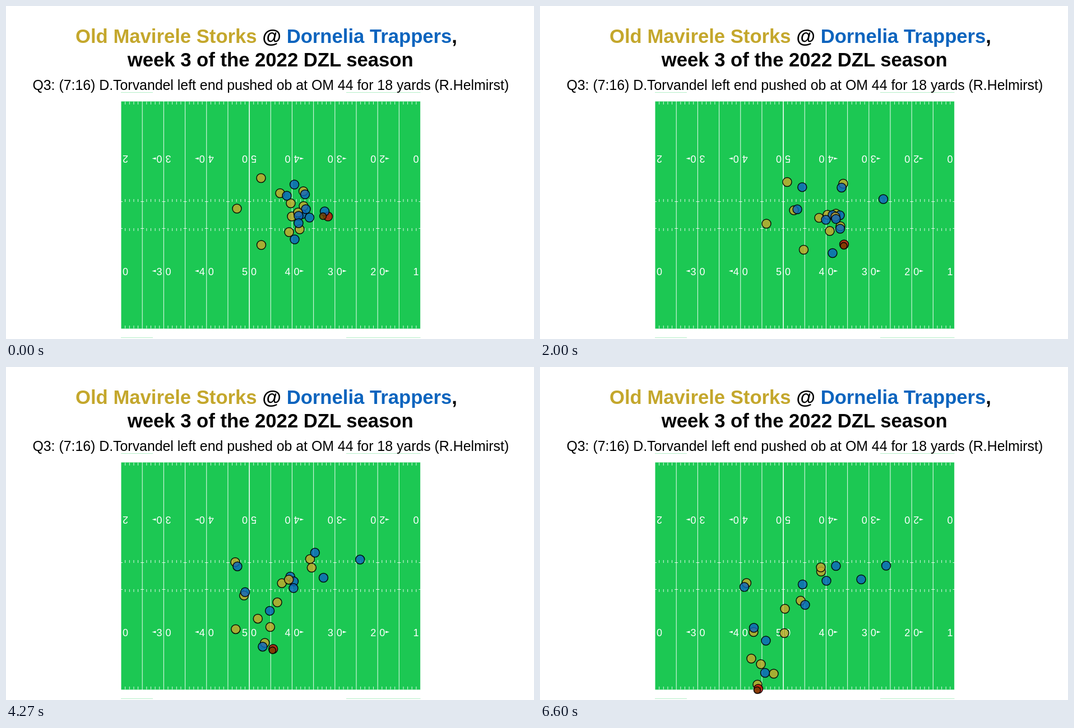
An HTML page with a canvas that plays this animation: 942x595 px, repeating every 6670 ms.

```html
<!DOCTYPE html>
<html lang="en">
<head>
<meta charset="utf-8">
<title>Play animation</title>
<style>
  html, body { margin: 0; width: 100%; height: 100%; overflow: hidden; background: #fff; }
  canvas, svg { position: absolute; left: 0; top: 0; width: 942px; height: 595px; }
  text { font-family: "Liberation Sans", Arial, sans-serif; }
  .title { font-size: 34.67px; font-weight: bold; }
  .play { font-size: 24.87px; text-anchor: middle; }
</style>
</head>
<body>
<canvas id="stage" width="942" height="595"></canvas>
<svg viewBox="0 0 942 595">
  <text class="title" x="124" y="66"><tspan fill="#c4a72c">Old Mavirele Storks</tspan> @ <tspan fill="#0c64be">Dornelia Trappers</tspan>,</text>
  <text class="title" x="471.7" y="108" text-anchor="middle">week 3 of the 2022 DZL season</text>
  <text class="play" x="472.3" y="150">Q3: (7:16) D.Torvandel left end pushed ob at OM 44 for 18 yards (R.Helmirst)</text>
</svg>
<script>
const LOOP = 6670, STEP = 200 / 3, LAST = 99;
const GOLD = '#c9a82c', BLUE = '#0c64c0', RED = '#cc0a08', BROWN = '#7b3f00';
const LEFT = 205, RIGHT = 739.5, TOP = 170, BOTTOM = 577;
const MID = 434.1, YARD = 7.635;
const KNOTS = [0, 30, 72, LAST];

const ctx = document.getElementById('stage').getContext('2d');
const dots = [];

// Weight of knot i in the cubic through all four
function weight(i, k) {
  return KNOTS.reduce((w, q, j) => j === i ? w : w * (k - q) / (KNOTS[i] - q), 1);
}

function add(color, pos, r = 8) {
  dots.push({ color, pos, r });
  return pos;
}

// A run is a cubic curve through four [x, y] points
function run(color, ...points) {
  return add(color, k => [0, 1].map(axis =>
    points.reduce((sum, p, i) => sum + p[axis] * weight(i, k), 0)));
}

// A blocker closes in on his man: the gap eases from one offset to another
function block(man, from, to) {
  return add(BLUE, k => {
    const u = k / LAST, e = u * (2 - u);
    return man(k).map((v, i) => v + from[i] + (to[i] - from[i]) * e);
  });
}

// Secondary and linebackers
const corner = run(GOLD, [455, 307.5], [441, 314.5], [400, 358], [368.5, 386]);
const backer = run(GOLD, [489, 334.5], [453, 365], [417, 421], [381, 473.5]);
run(GOLD, [412, 362], [404, 389], [409, 491], [388, 567.5]);
run(GOLD, [455.5, 427], [470.5, 435.5], [455, 508], [417, 548]);
run(GOLD, [508, 352.5], [498, 378.5], [434, 468], [377, 521]);

// Gold line
run(GOLD, [530.5, 331], [541, 317.5], [538, 350.5], [501.5, 365.5]);
run(GOLD, [531, 357.5], [528, 371], [480.5, 393], [437, 432]);
run(GOLD, [510, 376], [513, 373], [474, 434.5], [436, 475.5]);
run(GOLD, [524, 399], [517, 402], [456, 482], [394, 531]);
run(GOLD, [505, 404], [536, 393.5], [541, 353], [501, 358]);

// Centre of the scrimmage, stacked by depth
run(BLUE, [528, 372], [522, 373.5], [501, 376], [468.5, 388.5]);
run(BLUE, [535, 363], [535, 374], [509.5, 384], [511, 382]);
run(GOLD, [521, 369], [527, 376.5], [496.5, 384], [465, 417.5]);
run(BLUE, [522, 375], [510, 382], [457.5, 450], [403, 489]);
run(BLUE, [522, 388], [528, 380.5], [506, 401], [473, 425]);
run(BLUE, [515, 417], [535.5, 398], [571.5, 374], [573, 379.5]);
run(BLUE, [541.5, 378], [522, 441.5], [442, 511.5], [401.5, 546.5]);

// Receivers
block(corner, [59.5, 11.5], [-4, 7]);
block(backer, [12, 4.5], [.5, -7.5]);
run(BLUE, [533.5, 336.5], [538, 324.5], [551, 336], [528, 355.5]);

// Runner, passer and the ball, handed over early on
const runner = run(RED, [574.5, 376], [542.5, 426], [458, 522], [389.5, 575]);
run(BLUE, [568.5, 367], [612.5, 345], [631.5, 346], [617.5, 355]);
add(BROWN, k => {
  const [x, y] = runner(k), far = Math.max(0, 1 - k / 13);
  return [x - 9 * far - 2 * k / LAST, y - .5 + 3 * (1 - far)];
}, 6);

function line(x1, y1, x2, y2) {
  ctx.beginPath();
  ctx.moveTo(x1, y1);
  ctx.lineTo(x2, y2);
  ctx.stroke();
}

function label(x, y, text, dir, flip) {
  ctx.save();
  ctx.translate(x, y);
  if (flip) ctx.rotate(Math.PI);
  ctx.fillText(text[0], -8, 6.5);
  ctx.fillText(text[1], 8, 6.5);
  ctx.restore();
  if (!dir) return;
  const tip = x + dir * 21, base = x + dir * 14;
  ctx.beginPath();
  ctx.moveTo(tip, y - 1);
  ctx.lineTo(base, y - 3);
  ctx.lineTo(base, y + 1);
  ctx.fill();
}

function drawField() {
  ctx.strokeStyle = '#b4efc8';
  ctx.lineWidth = 1;
  for (const y of [154.5, 592.5]) {
    line(LEFT, y, 262, y);
    line(607, y, RIGHT, y);
  }

  ctx.save();
  ctx.beginPath();
  ctx.rect(LEFT, TOP, RIGHT - LEFT, BOTTOM - TOP);
  ctx.clip();
  ctx.fillStyle = '#1cc853';
  ctx.fillRect(LEFT, TOP, RIGHT - LEFT, BOTTOM - TOP);

  ctx.strokeStyle = 'rgba(255,255,255,.85)';
  for (let yd = -30; yd <= 40; yd++) {
    const x = MID + yd * YARD;
    if (yd % 5) {
      for (const y of [171, 345, 397, 571]) line(x, y, x, y + 5);
    } else {
      ctx.lineWidth = yd ? 1.1 : 1.8;
      line(x, TOP, x, BOTTOM);
      ctx.lineWidth = 1;
      line(x - 3, 349.5, x + 3, 349.5);
      line(x - 3, 397.5, x + 3, 397.5);
    }
  }
  ctx.strokeStyle = 'rgba(255,255,255,.5)';
  line(LEFT, TOP + .5, RIGHT, TOP + .5);
  line(LEFT, BOTTOM - .5, RIGHT, BOTTOM - .5);

  ctx.fillStyle = '#fff';
  ctx.font = '18px "Liberation Sans", Arial, sans-serif';
  ctx.textAlign = 'center';
  for (let yd = -30; yd <= 40; yd += 10) {
    const x = MID + yd * YARD, text = String(50 - Math.abs(yd));
    label(x, 273.5, text, Math.sign(yd), true);
    label(x, 474.5, text, Math.sign(yd), false);
  }
  ctx.restore();
}

function drawDot({ color, pos, r }, k) {
  const [x, y] = pos(k);
  ctx.beginPath();
  ctx.arc(x, y, r, 0, 2 * Math.PI);
  ctx.globalAlpha = .8;
  ctx.fillStyle = color;
  ctx.fill();
  ctx.globalAlpha = .9;
  ctx.strokeStyle = '#000';
  ctx.lineWidth = 1.5;
  ctx.stroke();
  ctx.globalAlpha = 1;
}

const start = performance.now();

function frame() {
  const t = Math.max(0, performance.now() - start) % LOOP;
  // Step times are rounded to 10 ms
  const k = Math.min(LAST, Math.floor((Math.floor(t / 10) * 10 + 3.4) / STEP));
  ctx.clearRect(0, 0, 942, 595);
  drawField();
  for (const d of dots) drawDot(d, k);
  requestAnimationFrame(frame);
}
frame();
</script>
</body>
</html>
```
